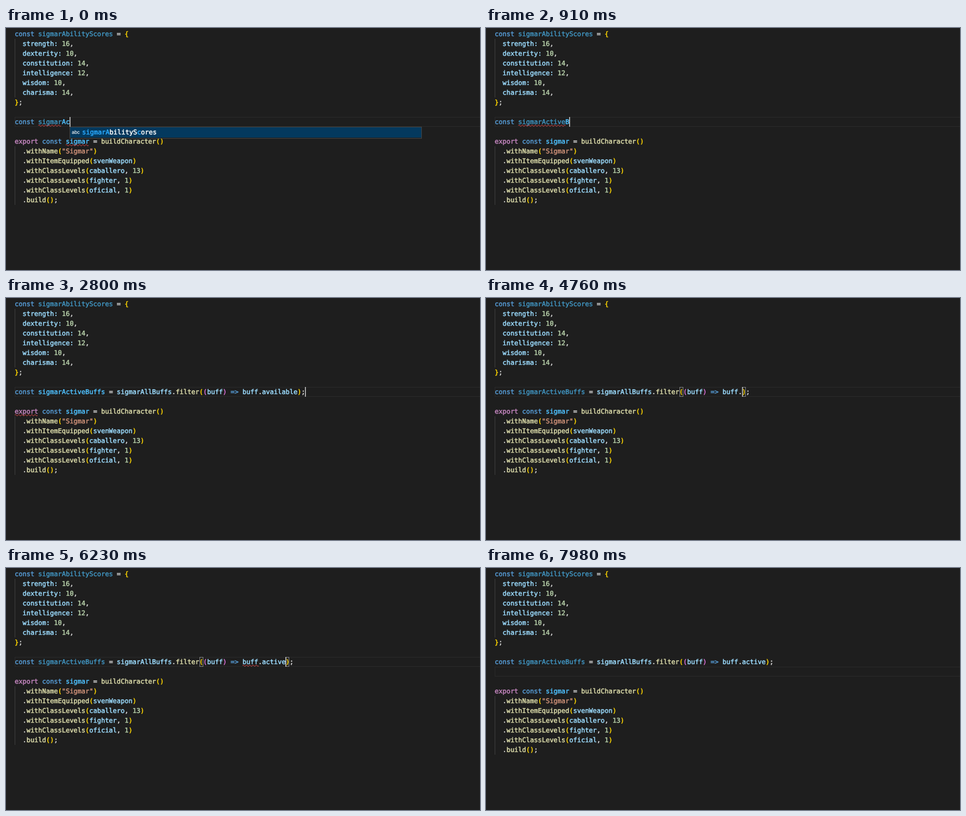
An HTML page that plays this animation: 872 px wide and 446 px high, repeating every 8 s.

```html
<!DOCTYPE html>
<html>
<head>
<meta charset="utf-8">
<style>
  html, body { margin: 0; width: 100%; height: 100%; overflow: hidden; background: #1e1e1e; }
  svg { display: block; }
  text {
    font: 12px "DejaVu Sans Mono", monospace;
    text-rendering: geometricPrecision;
    white-space: pre;
    fill: currentColor; stroke: currentColor; stroke-width: .5px;
  }
  .ghost { font-style: italic; stroke-width: .3px; }
  .abc { font: 9px "Liberation Sans", sans-serif; stroke-width: .1px; }
  path, .line { fill: none; }
</style>
</head>
<body>
<svg id="stage" width="872" height="446" viewBox="0 0 872 446"></svg>
<script>
const LOOP = 8000, CHAR = 7.224, ROW = 18, BASE = 12.6;
const BLUE = '#569cd6', BRIGHT = '#4fc1ff', DIM = '#4094c0', PALE = '#9cdcfe',
      GOLD = '#ffd700', PINK = '#da70d6', PLAIN = '#d4d4d4';

// In code text: | toggles fresh colour, ~ toggles ghost text, ¦ is the caret.
const head = `const sigmarAbilityScores = {
  strength: 16,
  dexterity: 10,
  constitution: 14,
  intelligence: 12,
  wisdom: 10,
  charisma: 14,
};
`.split('\n');
const tail = `
export const |sigmar| = buildCharacter()
  .withName("Sigmar")
  .withItemEquipped(svenWeapon)
  .withClassLevels(caballero, 13)
  .withClassLevels(fighter, 1)
  .withClassLevels(oficial, 1)
  .build();`.split('\n');

const word = ['|sigmarA|bilityS|c|ores'];
const fields = ['active', 'changes?', 'contextualChanges?', 'description', 'name',
  'originName', 'originType', 'originUniqueId', 'specialChanges?', 'uniqueId'];
const name = 'const sigmarActiveBuffs';
const call = 'sigmarAllBuffs.filter((buff) => buff';
const full = `${name} = ${call}`;
const freshName = 'const |sigmarActiveBuffs|';

// Squiggles are [row, column, length].
const nameErr = len => [9, 6, len], exportErr = [11, 0, 6], buffErr = [9, 58, 4], propErr = [9, 63, 9];

// [start time, text of the edited line, { err, menu, col, word, match }]
const steps = [
  [0, 'const sigmar|Ac¦', { err: [nameErr(6), [11, 13, 6]], menu: word, col: 14, word: true }],
  [210, 'const sigmar|Act¦', { err: [nameErr(6), [11, 13, 6]] }],
  [350, 'const sigmarAct|i¦', { err: [nameErr(9)] }],
  [560, 'const sigmarAct|iv¦', { err: [nameErr(9)] }],
  [630, 'const sigmarAct|ive¦', { err: [nameErr(9)] }],
  [700, 'const sigmarActive¦', { err: [nameErr(12)], menu: word, col: 18, word: true }],
  [910, 'const sigmarActive|B¦', { err: [nameErr(12)] }],
  [1050, 'const sigmarActive|Bu¦', { err: [nameErr(12)] }],
  [1120, 'const sigmarActive|Buf¦', { err: [nameErr(12)] }],
  [1190, 'const sigmarActive|Buff¦', { err: [nameErr(12)] }],
  [1400, 'const sigmarActive|Buffs¦', { err: [nameErr(17)] }],
  [1820, `${name} ¦`, { err: [nameErr(17)] }],
  [1960, `${name} =¦`, { err: [nameErr(17)] }],
  [2100, `${name} =¦`, { err: [exportErr] }],
  [2170, `${name} =¦~ ${call}.available);`, { err: [exportErr] }],
  [2450, `${name} = ¦~${call}.available);`, { err: [exportErr] }],
  [2590, `${freshName} = ¦~${call}.available);`, { err: [exportErr] }],
  [2730, `${freshName} = ${call}.available);¦`, { err: [exportErr] }],
  [3080, `${full}.available);¦`, { err: [propErr] }],
  [3220, `${full}.available);`, { err: [propErr] }],
  [3570, `${full}.available)¦;`, { err: [propErr], match: true }],
  [3640, `${full}.available¦);`, { err: [propErr], match: true }],
  [4060, `${full}.available);`, { err: [propErr], match: true }],
  [4410, `${full}.available¦);`, { err: [propErr], match: true }],
  [4760, `${full}.¦);`, { match: true }],
  [5040, `${full}.¦);`, { err: [buffErr], match: true }],
  [5390, `${full}¦);`, { err: [buffErr], match: true }],
  [5460, `${full}¦~.available~);`, { err: [buffErr], match: true }],
  [5600, `${full}~.available~);`, { err: [buffErr], match: true }],
  [5740, `${full}.¦~available~);`, { err: [buffErr], match: true }],
  [5810, `${full}.¦~available~);`, { err: [buffErr], match: true, menu: fields, col: 63 }],
  [5880, `${full}.a¦~vailable~);`, { err: [buffErr], match: true, menu: ['|a|ctive'], col: 63 }],
  [5950, `${full}.ac¦);`, { err: [buffErr], match: true, menu: ['|ac|tive'], col: 63 }],
  [6230, `${full}.active¦);`, { err: [buffErr], match: true }],
  [6370, `${full}.active¦);`, { match: true }],
  [6720, `${full}.active);`, { match: true }],
  [6860, `${full}.active)¦;`, { match: true }],
  [7000, `${full}.active);¦`, {}],
  [7490, `${full}.active);\n¦`, {}],
  [7980, `${full}.active);\n`, {}],
];

const colX = col => 16 + col * CHAR;
const rowY = row => 2 + row * ROW;
const text = (x, y, s, color, cls = '') => `<text class="${cls}" x="${x}" y="${y}" color="${color}">${s.replace(/>/g, '&gt;')}</text>`;
const rect = (x, y, w, h, fill) => `<rect x="${x}" y="${y}" width="${w}" height="${h}" fill="${fill}"/>`;
const frame = (x, y, w, h, color) =>
  `<rect class="line" x="${x + .5}" y="${y + .5}" width="${w - 1}" height="${h - 1}" stroke="${color}"/>`;
const path = (d, color) => `<path d="${d}" stroke="${color}"/>`;

function plainColor(token, next, fresh) {
  if (/^(const|=>)$/.test(token)) return BLUE;
  if (token === 'export') return '#c586c0';
  if (token[0] === '"') return '#ce9178';
  if (/^\d/.test(token)) return '#b5cea8';
  if (!/^[a-z]/i.test(token)) return PLAIN;
  if (next === '(') return '#dcdcaa';
  if (fresh) return BRIGHT;
  return /^sigmar(?!All)/.test(token) ? DIM : PALE;
}

function codeLine(line, row) {
  let out = '', marks = 0, depth = 0, fresh = false, ghost = false;
  const y = rowY(row);
  for (const m of line.matchAll(/[|~¦]|\bconst\b|=>|"[^"]*"|\d+|[a-z]+:?|\S/gi)) {
    const token = m[0], x = colX(m.index - marks);
    if ('|~¦'.includes(token)) {
      marks++;
      if (token === '|') fresh = !fresh;
      else if (token === '~') ghost = !ghost;
      else out += rect(Math.floor(x), y, 1.5, ROW, '#d0d0d0');
      continue;
    }
    let color = plainColor(token, line[m.index + token.length], fresh);
    if ('({'.includes(token)) color = depth++ ? PINK : GOLD;
    if (')}'.includes(token)) color = --depth > 0 ? PINK : GOLD;
    out += text(x, y + BASE, token, ghost ? '#747474' : color, ghost ? 'ghost' : '');
  }
  return out;
}

function squiggle([row, col, len]) {
  const waves = Math.round(len * CHAR / 3);
  return path(`M${colX(col)} ${rowY(row) + 16}q1.5 -3 3 0` + 't3 0'.repeat(waves - 1), '#f14c4c');
}

function cube(x, y, color) {
  return path(`M${x - 6.5} ${y - 2.5}l7.5 -3.5l6 2.5v6l-7 4l-6.5 -3zl6.5 3l7 -4m-7 4v6`, color);
}

function menu({ menu: items, col, word }) {
  const x = Math.round(colX(col)), top = 182, h = items.length * ROW + 4;
  let out = rect(x, top, 648, h, '#1e1e1e') + frame(x, top, 648, h, '#454545')
    + rect(x + 1, top + 1, 646, ROW + 1, '#04395e');
  items.forEach((item, i) => {
    const y = top + 1 + i * ROW;
    out += word ? text(x + 4, y + 12, 'abc', '#fff', 'abc')
                : cube(x + 11, y + 9, i ? '#75beff' : '#e4f2ff');
    let at = 0;
    item.split('|').forEach((part, k) => {
      out += text(x + 23 + at * CHAR, y + BASE, part, k % 2 ? '#2aaaff' : i ? PLAIN : '#fff');
      at += part.length;
    });
  });
  return out;
}

function draw([, line, opts]) {
  const edited = line.split('\n');
  const lines = [...head, ...edited, ...tail];
  const current = head.length + edited.length - 1;
  const guide = (from, count) => rect(16, rowY(from), 1, count * ROW, '#404040');

  let out = frame(16, rowY(current), 900, ROW, '#2a2a2a') + guide(1, 6) + guide(current + 3, 6);
  if (opts.match) {
    const close = line.replace(/[|~¦]/g, '').lastIndexOf(')');
    for (const col of [47, close]) out += frame(Math.round(colX(col)), rowY(9), 7, ROW, '#888');
  }
  out += lines.map(codeLine).join('') + (opts.err || []).map(squiggle).join('');
  if (opts.menu) out += menu(opts);
  return out;
}

const stage = document.getElementById('stage');
let shown;
function tick() {
  const t = performance.now() % LOOP;
  const step = steps.findLast(s => s[0] <= t);
  if (step !== shown) stage.innerHTML = draw(shown = step);
  requestAnimationFrame(tick);
}
tick();
</script>
</body>
</html>
```
